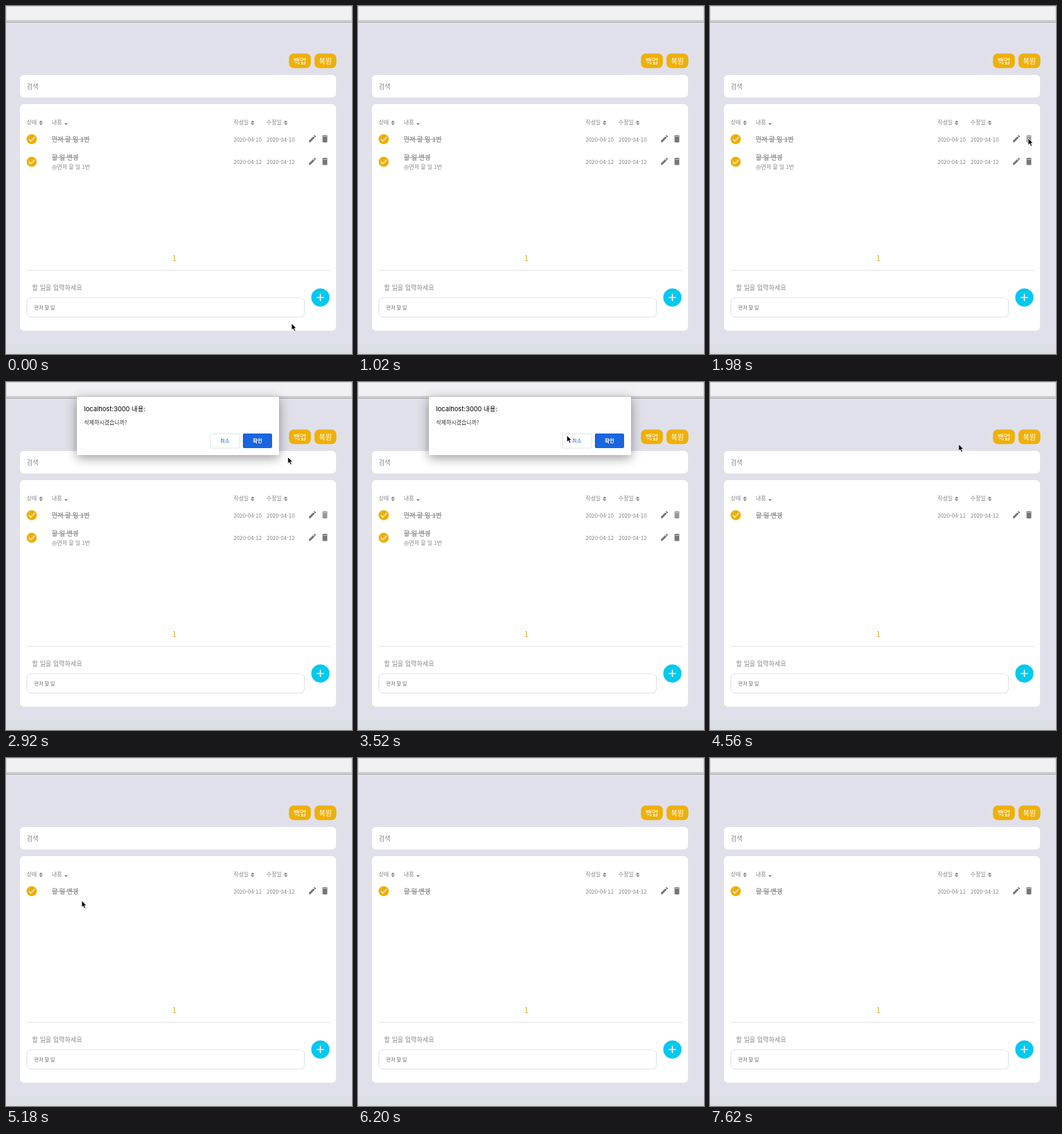
Recreate the animation shown at these times as an HTML page. Size 498 by 500 pixels, loop 8.1 s.

```html
<!DOCTYPE html>
<html lang="ko">
<head>
<meta charset="utf-8">
<title>할 일</title>
<style>
  html, body { margin: 0; width: 100%; height: 100%; overflow: hidden; }
  #stage { position: fixed; inset: 0; overflow: hidden; contain: strict; background: #e0e0ea; }
  svg { position: absolute; display: block; }
  .full { inset: 0; width: 100%; height: 100%; }
  text { font-family: "Noto Sans CJK KR", "Noto Sans CJK", "Noto Sans", sans-serif; fill: #858585; white-space: pre; }
  .done { font-size: 9px; font-weight: 700; fill: #999; text-decoration: line-through; }
  .small { font-size: 7.9px; }
  .label { font-size: 9.1px; }
  .icon { fill: #777; }
  .middle { text-anchor: middle; }
  #dialog { left: 102px; top: 21px; width: 291px; height: 84px; overflow: visible; }
  #dialog .title { font: 9.3px Inter, "Noto Sans CJK KR", sans-serif; fill: #000; }
  #box { filter: drop-shadow(0 4px 8px rgba(0, 0, 0, .4)); }
</style>
</head>
<body>
<div id="stage">
  <svg id="page" class="full"></svg>
  <svg id="dialog">
    <rect id="box" width="291" height="84" rx="1.5" fill="#fff"/>
    <text class="title" x="10.5" y="21">localhost:3000 내용:</text>
    <text class="small" x="10.5" y="39.5" style="fill:#333">삭제하시겠습니까?</text>
    <rect x="192.5" y="53.5" width="41.5" height="20.5" rx="2" fill="#fff" stroke="#dadce0" stroke-width=".8"/>
    <text class="middle" x="213" y="66.3" font-size="7.4" font-weight="500" style="fill:#1a66de">취소</text>
    <rect id="ok" x="239" y="53" width="42" height="21" rx="2"/>
    <text class="middle" x="260" y="66.3" font-size="7.4" font-weight="700" style="fill:#fff">확인</text>
  </svg>
  <svg class="full">
    <path id="cursor" d="M0 0V9.6L2.2 7.6L3.8 11.3L5.6 10.5L4 6.9H7Z" fill="#000" stroke="#fff" stroke-width=".8" stroke-linejoin="round"/>
  </svg>
</div>
<script>
const LOOP = 8100;
const GOLD = '#efb007';
const $ = id => document.getElementById(id);

const rect = (x, y, w, h, r, fill, extra = '') =>
  `<rect x="${x}" y="${y}" width="${w}" height="${h}" rx="${r}" fill="${fill}" ${extra}/>`;
const text = (x, y, str, cls, extra = '') => `<text x="${x}" y="${y}" class="${cls}" ${extra}>${str}</text>`;
const button = (x, str) => rect(x, 68.2, 31.5, 21, 7, GOLD) +
  text(x + 15.75, 82.6, str, 'middle', 'font-size="10" style="fill:#fff"');
const arrow = (x, y, h) => `<path class="icon" d="M${x - 2.6} ${y}h5.2l-2.6 ${h}z"/>`;
const column = (x, str, arrowX) => text(x, 169.8, str, 'small') + arrow(arrowX, 168.4, 2.7);
const sortable = (x, str, arrowX) => column(x, str, arrowX) + arrow(arrowX, 167.2, -2.7);

const pencil = '<path class="icon" d="M436 193.9v2.1h2.1l6.2-6.2-2.1-2.1zM442.8 187.1l2.1 2.1 1-1q.4-.4 0-.8l-1.3-1.3q-.4-.4-.8 0z" transform="translate(0 -.3)"/>';
const trash = id => `<path class="icon" id="${id}" d="M455.6 188.1h6.8v6.8q0 1-1 1h-4.8q-1 0-1-1zM455 187.4v-1.2h2l.6-.6h2.8l.6.6h2v1.2z"/>`;

// A row is laid out for the first line of the list and moved down by dy.
function row(id, dy, title, date, sub = '') {
  return `<g id="${id}" transform="translate(0 ${dy})">
    <circle cx="37" cy="191.3" r="7.3" fill="${GOLD}"/>
    <path d="M32.9 191.4l2.8 2.8 5.5-5.8" fill="none" stroke="#fff" stroke-width="1.2"/>
    ${text(66, sub ? 188.6 : 195, title, 'done')}${text(66, 201.4, sub, 'small')}
    ${text(327.5, 194.5, date, 'small')}${text(375, 194.5, date, 'small')}
    ${pencil}${trash(id + 'Trash')}
  </g>`;
}

$('page').innerHTML = `
  <linearGradient id="floor" x2="0" y2="1"><stop stop-color="#e0e0ea"/><stop offset="1" stop-color="#d8dee1"/></linearGradient>
  ${rect(0, 480, 498, 20, 0, 'url(#floor)')}
  ${rect(0, 0, 498, 21, 0, '#f0f0f5', 'stroke="#d2d2d5" stroke-width="2"')}
  ${rect(0, 22.5, 498, 1.3, 0, '#aaaaae')}
  ${button(407.3, '백업')}${button(444, '복원')}
  ${rect(20, 99, 455, 32.5, 6, '#fff')}
  ${text(29.8, 119, '검색', 'label')}
  ${rect(20, 141, 455, 325.5, 6, '#fff')}
  ${sortable(29.8, '상태', 50.2)}${column(66, '내용', 86.4)}
  ${sortable(327.5, '작성일', 354.8)}${sortable(375, '수정일', 402.6)}
  ${row('first', 0, '먼저 할 일 1번', '2020-04-10')}
  ${row('second', 32.5, '할 일 변경', '2020-04-12', '@먼저 할 일 1번')}
  ${row('moved', 0, '할 일 변경', '2020-04-12')}
  ${text(242.2, 366, '1', 'middle', `font-size="10.8" style="fill:${GOLD}"`)}
  ${rect(30, 379.4, 436, 1, 0, '#dedee2')}
  ${text(37.5, 408.3, '할 일을 입력하세요', 'label')}
  ${rect(30, 419, 399.5, 28, 6, '#fff', 'stroke="#dfdfe5"')}
  ${text(40.7, 436, '먼저 할 일', '', 'font-size="7" style="fill:#666"')}
  <circle cx="452.5" cy="418.8" r="13.1" fill="#00c8ee"/>
  <path d="M447.2 418.8h10.6M452.5 413.5v10.6" stroke="#fff" stroke-width="1.5"/>`;

const START = { x: 411, y: 456 };
const OUTSIDE = { x: 505, y: 272 };
const TRASH = { x: 458, y: 190 };
const MESSAGE = { x: 119, y: 59 };
const OK = { x: 367.5, y: 85 };
const ITEM = { x: 109, y: 205 };
const beside = (p, dx, dy) => ({ x: p.x + dx, y: p.y + dy });

// Pointer moves: start, end, destination, sideways bend
const MOVES = [
  [720, 1020, OUTSIDE, 1.75],
  [1200, 2000, TRASH, .3],
  [2840, 3110, MESSAGE, -.47],
  [3110, 3340, beside(MESSAGE, 56, 2), 0],
  [3340, 3640, OK, 0],
  [4480, 5180, ITEM, 0],
  [5180, 5320, beside(ITEM, -35, 3), 0],
  [5320, 5760, beside(ITEM, 125, 18), 0],
  [6000, 6200, OUTSIDE, 0],
  [7180, 7280, { x: 447, y: 289 }, 0],
  [7500, 7620, { x: 335, y: -14 }, 0]
];

const clamp = v => Math.max(0, Math.min(1, v));
const progress = (t, start, end) => clamp((t - start) / (end - start));
const smooth = p => p * p * (3 - 2 * p);

function pointer(t) {
  const i = Math.max(0, MOVES.findLastIndex(move => t >= move[0]));
  const [start, end, to, bend] = MOVES[i];
  const from = i ? MOVES[i - 1][2] : START;
  const u = smooth(progress(t, start, end));
  const dx = to.x - from.x, dy = to.y - from.y;
  const side = 2 * u * (1 - u) * bend;
  return [from.x + dx * u + dy * side, from.y + dy * u - dx * side];
}

const show = (id, visible) => $(id).style.display = visible ? '' : 'none';

function draw(t) {
  $('cursor').setAttribute('transform', `translate(${pointer(t)})`);

  const deleted = t >= 4220;
  show('first', !deleted);
  show('second', !deleted);
  show('moved', deleted);
  $('firstTrash').style.fill = t >= 1940 ? '#979797' : '';

  const open = 1 - (1 - progress(t, 2280, 2480)) ** 2;
  const close = progress(t, 3980, 4130);
  const tilt = Math.max(close, (1 - open) * .3);
  show('dialog', open > 0 && close < 1);
  $('dialog').style.opacity = open * (1 - close ** 1.25);
  $('dialog').style.transform =
    `translateY(${-10 * tilt}px) perspective(500px) rotateX(${15 * tilt}deg) scale(${1 - .025 * tilt})`;
  $('ok').setAttribute('fill', t >= 3740 && t < 3840 ? '#1859c4' : '#1a66de');
}

function frame() {
  draw(performance.now() % LOOP);
  requestAnimationFrame(frame);
}
frame();
</script>
</body>
</html>
```
